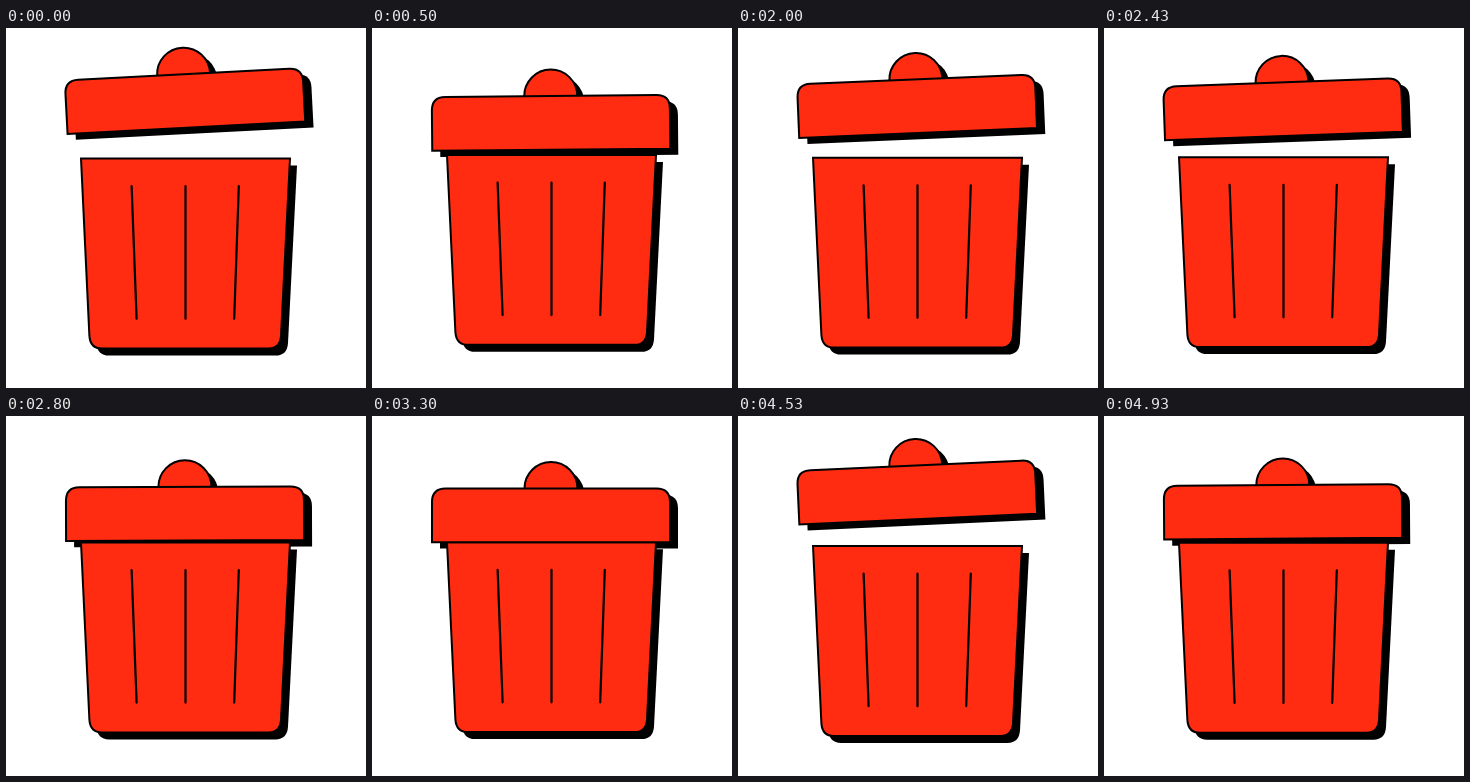
An HTML page for the animation above (5000 ms loop, 360x360 px).

```html
<!DOCTYPE html>
<html lang="en">
<head>
<meta charset="utf-8">
<title>Trash can</title>
<style>
  html, body { margin: 0; width: 100%; height: 100%; overflow: hidden; background: #fff; }
  svg { display: block; width: 100vw; height: 100vh; }
  .part { fill: #ff2c12; stroke: #000; stroke-width: 2; stroke-linejoin: miter; }
  .slots { fill: none; stroke: #000; stroke-width: 2.2; stroke-linecap: round; }
</style>
</head>
<body>
<svg viewBox="0 0 360 360">
  <defs>
    <path id="can" d="M75 126.2H284L275 303.5Q274.2 316.1 262.5 316.1H96Q84.2 316.1 83.4 303.5Z"/>
    <path id="cover" d="M60 126.2V86Q60 72.5 73.5 72.5H284.5Q298 72.5 298 86V126.2Z"/>
    <circle id="knob" cx="179" cy="72.5" r="26.5"/>
  </defs>
  <g class="body"><use href="#can" x="7" y="7"/></g>
  <g class="lid">
    <use href="#knob" x="7" y="6.5"/>
    <use href="#cover" x="8" y="6.3"/>
  </g>
  <g class="body">
    <use class="part" href="#can"/>
    <path class="slots" d="M125.6 153.8L130.6 286.3M179.5 153.8V286.3M232.8 153.8L228.2 286.3"/>
  </g>
  <g class="lid">
    <use class="part" href="#knob"/>
    <use class="part" href="#cover"/>
  </g>
</svg>
<script>
  const LOOP = 5000, CYCLE = 2200;
  const OPEN_AT = 1590, PEAK_AT = 2167, CLOSE_TIME = 800;
  const LIFT = 26.5, TILT = -3, SINK = 4.4;

  const bodies = document.querySelectorAll('.body');
  const lids = document.querySelectorAll('.lid');

  const smooth = u => u * u * (3 - 2 * u);
  const clamp = v => Math.min(1, Math.max(0, v));

  // Cubic easing with horizontal handles at x1 and x2.
  function ease(p, x1, x2) {
    let lo = 0, hi = 1;
    for (let i = 0; i < 24; i++) {
      const u = (lo + hi) / 2, v = 1 - u;
      const x = 3 * u * v * v * x1 + 3 * u * u * v * x2 + u ** 3;
      if (x < p) lo = u; else hi = u;
    }
    return smooth((lo + hi) / 2);
  }

  // 0 is shut, 1 is fully open.
  function openness(t) {
    const c = t % CYCLE;
    if (c >= OPEN_AT && c < PEAK_AT) {
      return smooth((c - OPEN_AT) / (PEAK_AT - OPEN_AT));
    }
    const sincePeak = (c - PEAK_AT + CYCLE) % CYCLE;
    return 1 - ease(clamp(sincePeak / CLOSE_TIME), 0.33, 0.5);
  }

  // Two poses per 100 ms, held for 30 and 70 ms.
  function step(t) {
    const base = Math.floor(t / 100) * 100;
    return t - base < 30 ? base : base + 30;
  }

  function draw(time) {
    const k = openness(step(time % LOOP));
    const lidMove = `translate(0 ${-LIFT * k}) rotate(${TILT * k} 179 99.3)`;
    lids.forEach(g => g.setAttribute('transform', lidMove));
    bodies.forEach(g => g.setAttribute('transform', `translate(0 ${SINK * k})`));
  }

  const start = performance.now();
  function tick() {
    draw(performance.now() - start);
    requestAnimationFrame(tick);
  }
  tick();
</script>
</body>
</html>
```
